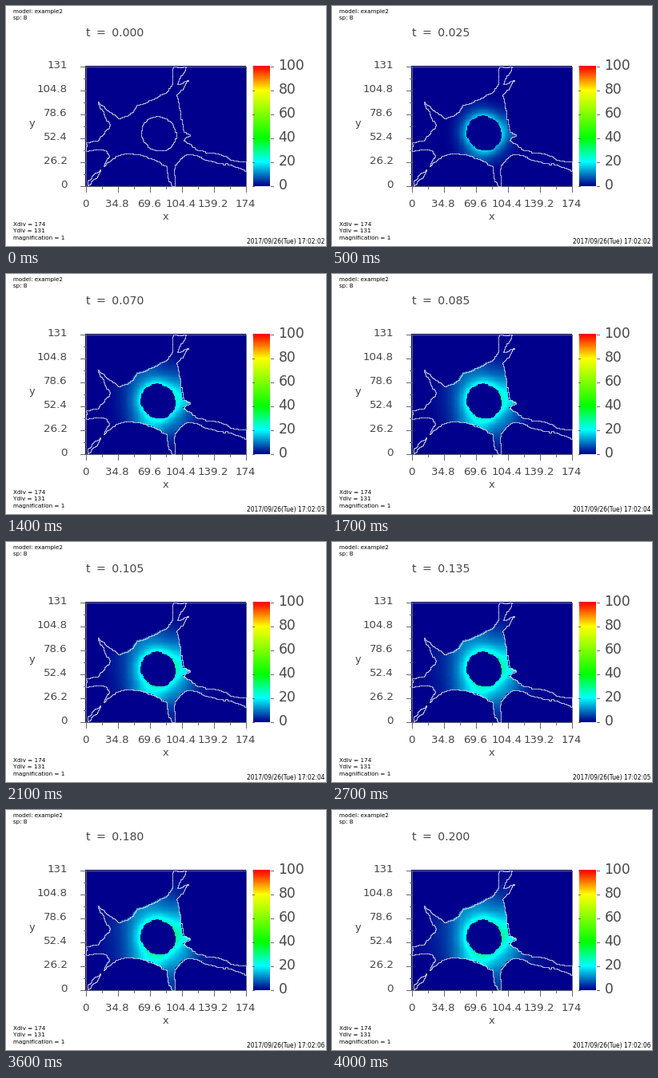
Recreate the animation shown at these times as a matplotlib script. Size 400 by 301 pixels, loop 4.1 s.

```python
import numpy as np
import matplotlib.pyplot as plt
from matplotlib.animation import FuncAnimation
from matplotlib.collections import LineCollection
from matplotlib.colors import LinearSegmentedColormap
from matplotlib.path import Path

W, H, DPI = 400, 301, 64
PX = 72 / DPI                      # one pixel in points
FRAMES, INTERVAL, STEP = 41, 100, .005
NX, NY = 174, 131
LEFT, RIGHT, TOP, BOTTOM = 99, 299, 75, 225
INK, GREY, LINE = "#484848", "#6a6a6a", "#dcdcea"

# Key points of the cell in stage pixels; the ragged detail is random
WEST = [(224, 75), (208, 75), (207, 95), (197, 109), (183, 116), (163, 123),
        (156, 133), (140, 140), (126, 130), (108, 109), (123, 140),
        (129, 148), (115, 167), (99, 170)]
SOUTH = [(99, 181), (124, 180), (128, 187), (101, 219), (101, 225),
         (118, 203), (134, 189), (147, 184), (180, 190), (200, 200),
         (206, 225)]
EAST = [(210, 225), (210, 198), (222, 186), (235, 186), (255, 193),
        (280, 198), (299, 206), (299, 194), (262, 184), (238, 180),
        (221, 167), (231, 161), (221, 157), (217, 130), (212, 111),
        (227, 92), (213, 97), (222, 81)]

cmap = LinearSegmentedColormap.from_list("heat", [
    (0, (0, 0, .55)), (.2, (0, 1, 1)), (.4, (0, 1, 0)), (.8, (1, 1, 0)),
    (1, (1, 0, 0))])


def roughen(points, rng, amount=.08, levels=3):
    """Midpoint displacement across each side of a closed outline."""
    p = np.array(points, float)
    for _ in range(levels):
        side = np.roll(p, -1, axis=0) - p
        normal = side[:, ::-1] * (1, -1)
        shift = rng.uniform(-amount, amount, (len(p), 1))
        p = np.stack([p, p + side / 2 + shift * normal], 1).reshape(-1, 2)
    return p


def nucleus_outline():
    a = np.linspace(0, 2 * np.pi, 60, endpoint=False)
    r = 21.6 + np.cos(a - .6) + .8 * np.sin(2 * a) + .3 * np.sin(7 * a)
    return np.stack([189 + r * np.cos(a), 158.5 + r * np.sin(a)], axis=1)


def rasterize(outline):
    x = LEFT + (np.arange(NX) + .5) * (RIGHT - LEFT) / NX
    y = TOP + (np.arange(NY) + .5) * (BOTTOM - TOP) / NY
    grid = np.stack(np.meshgrid(x, y), axis=-1).reshape(-1, 2)
    closed = np.vstack([outline, outline[:1]])
    return Path(closed).contains_points(grid).reshape(NY, NX)


def border(mask):
    """Stair-step segments along the edge of a mask."""
    m = np.pad(mask, 1)
    sx = LEFT + np.round(np.arange(NX + 1) * (RIGHT - LEFT) / NX) + .5
    sy = TOP + np.round(np.arange(NY + 1) * (BOTTOM - TOP) / NY) + .5
    upright = np.argwhere(m[1:-1, 1:] != m[1:-1, :-1])
    level = np.argwhere(m[1:, 1:-1] != m[:-1, 1:-1])
    return ([[(sx[j], sy[i]), (sx[j], sy[i + 1])] for i, j in upright] +
            [[(sx[j], sy[i]), (sx[j + 1], sy[i])] for i, j in level])


def simulate(cytoplasm, nucleus, diffusion=3360, decay=13, feed=88,
             level=100, substeps=80):
    """Diffusion with decay, fed through the nuclear membrane."""
    dt = STEP / substeps
    near = np.zeros_like(nucleus)
    for axis in (0, 1):
        for step in (-1, 1):
            near |= np.roll(nucleus, step, axis)
    source = feed * dt * (near & cytoplasm)
    across = diffusion * dt * (cytoplasm[:, 1:] & cytoplasm[:, :-1])
    down = diffusion * dt * (cytoplasm[1:] & cytoplasm[:-1])
    c = np.zeros(cytoplasm.shape)
    fields = [c.copy()]
    for _ in range(FRAMES - 1):
        for _ in range(substeps):
            fx = (c[:, 1:] - c[:, :-1]) * across
            fy = (c[1:] - c[:-1]) * down
            c = c * (1 - decay * dt) + source * (level - c)
            c[:, :-1] += fx
            c[:, 1:] -= fx
            c[:-1] += fy
            c[1:] -= fy
        fields.append(c.copy())
    return fields


cell = rasterize(roughen(WEST + SOUTH + EAST, np.random.default_rng(4)))
nucleus = rasterize(nucleus_outline())
fields = simulate(cell & ~nucleus, nucleus)

fig = plt.figure(figsize=(W / DPI, H / DPI), dpi=DPI, facecolor="white")
ax = fig.add_axes([0, 0, 1, 1])
ax.axis("off")


def label(x, y, text, size, ha="left", va="baseline", color=INK):
    return ax.text(x, y, text, fontsize=size * PX, ha=ha, va=va, color=color,
                   family="DejaVu Sans")


def rule(x0, y0, x1, y1):
    ax.plot([x0 + .5, x1 + .5], [y0 + .5, y1 + .5], color=GREY, lw=PX,
            zorder=2)


def image(data, x0, x1, vmax):
    return ax.imshow(data, extent=(x0, x1, BOTTOM + 1, TOP), cmap=cmap,
                     vmin=0, vmax=vmax, aspect="auto",
                     interpolation="nearest", zorder=1)


def outline(mask):
    lines = LineCollection(border(mask), colors=LINE, linewidths=PX,
                           capstyle="butt", zorder=3)
    return ax.add_collection(lines)


heat = image(fields[0], LEFT, RIGHT + 1, 100)
image(np.linspace(1, 0, 151)[:, None], 309, 330, 1)
ax.set_xlim(0, W)
ax.set_ylim(H, 0)

for y in (TOP, BOTTOM):
    rule(LEFT, y, RIGHT, y)
for x in (LEFT, RIGHT):
    rule(x, TOP, x, BOTTOM)
outline(cell)
membrane = outline(nucleus)

for k in range(11):
    x, y = LEFT + 20 * k, BOTTOM - 15 * k
    size = 3 if k % 2 else 7
    rule(x, BOTTOM + 1, x, BOTTOM + size)
    rule(LEFT - size, y, LEFT - 1, y)
for k in range(6):
    x, y = LEFT + 40 * k, BOTTOM - 30 * k
    rule(307, y, 309, y)
    rule(330, y, 333, y)
    label(x, 248, f"{k * NX / 5:.4g}", 13.4, "center", "center")
    label(77, y, f"{k * NY / 5:.4g}", 13.4, "right", "center")
    label(340.5, y, str(20 * k), 17.2, "left", "center")

label(199, 264, "x", 13, "center", "center")
label(32, 147, "y", 13, "center", "center")
label(9, 9.5, "model: example2", 7.1, color="black")
label(9, 17.5, "sp: B", 7.1, color="black")
label(9, 276.5, f"Xdiv = {NX}", 7.2, color="black")
label(9, 284.5, f"Ydiv = {NY}", 7.2, color="black")
label(9, 292.5, "magnification = 1", 7.2, color="black")
title = label(100, 38.5, "", 14.1)
clock = label(398.5, 298, "", 7.5, "right", color="black")


def update(n):
    heat.set_data(fields[n])
    membrane.set_visible(n == 0)   # hidden once the membrane releases
    title.set_text(f"t\u2009 =\u2009 {n * STEP:.3f}")
    clock.set_text(f"2017/09/26(Tue) 17:02:{2 + (n + 1) // 9:02d}")
    return heat, membrane, title, clock


anim = FuncAnimation(fig, update, frames=FRAMES, interval=INTERVAL,
                     repeat=True, repeat_delay=0, blit=False)
plt.show()
```
